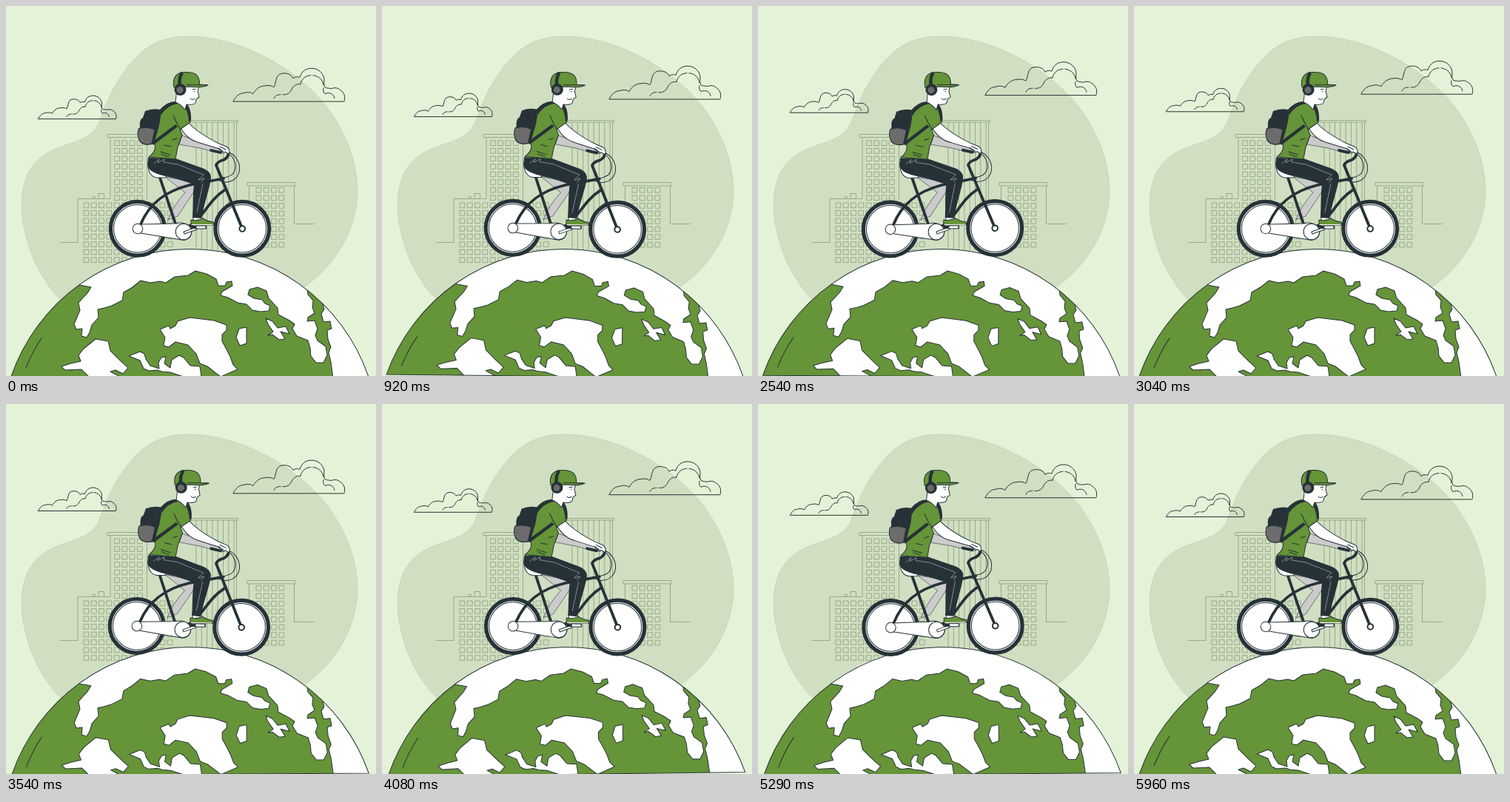
Write an HTML page that moves like this. It is 500 px wide and 500 px high and loops after 6000 ms.

```html
<!DOCTYPE html>
<html lang="en">
<head>
<meta charset="utf-8">
<title>Cycling over the globe</title>
<style>
html, body { margin: 0; height: 100%; overflow: hidden; background: #e4f3d7; }
svg { display: block; width: 100%; height: 100%; }
.line { fill: none; stroke: #263238; stroke-width: 1; stroke-linejoin: round; stroke-linecap: round; }
.city { fill: none; stroke: #90a583; stroke-width: .9; }
.dark { fill: #263238; }
.white { fill: #fff; stroke: #263238; stroke-width: 1; stroke-linejoin: round; }
.green { fill: #669438; stroke: #263238; stroke-width: 1; stroke-linejoin: round; }
.grey { fill: #cbcbcb; stroke: #263238; stroke-width: .6; }
.tube { fill: none; stroke: #263238; stroke-width: 3.8; stroke-linecap: round; stroke-linejoin: round; }
.band { stroke-width: 4.5; stroke-linecap: butt; }
.stitch { stroke: #aab0b3; stroke-width: .7; }
.sole { stroke: #fff; }
#cloud path { vector-effect: non-scaling-stroke; }
</style>
</head>
<body>
<svg viewBox="0 0 500 500">
  <defs>
    <path id="dome" d="M7 500.5A255.3 255.3 0 0 1 489.700 500.5Z"/>
    <clipPath id="inDome"><use href="#dome"/></clipPath>
    <g id="cloud" class="line">
      <path d="M0 0C3 -6 8 -11 14 -11C19 -13 24 -12 27 -10C30 -16 36 -21 44 -21C50 -22 53 -20 55 -19C58 -24 57 -32 62 -36C69 -40 79 -37 81 -31C85 -34 88 -33 90 -32C92 -40 98 -44.500 106 -44.500C115 -44.500 122 -38 123 -30C123 -25 122 -22 124 -19C127 -17 130 -18 132 -17C138 -19 142 -18 145 -15C150 -12 152 -6 150 0Z"/>
      <path d="M55 -4C57 -8 60 -9 64 -9M67 -9C72 -8 77 -11 79 -16C82 -22 87 -24 91 -23C92 -30 98 -35 105 -35M108 -35C116 -34 121 -29 122 -22M122 -18C121 -15 122 -12 124 -10C130 -13 136 -10 137 -4"/>
    </g>
    <g id="wheel">
      <circle r="36.400" fill="#fff" stroke="#263238" stroke-width="5.200"/>
      <circle r="32.300" class="line"/>
    </g>
  </defs>

  <path fill="#d0dfc1" stroke="#bccbb0" stroke-width=".6" d="M250 41C310 42 380 76 424 125C458 163 475 211 475 249C475 300 447 350 400 382L250 450L82 404C48 378 21 318 21 268C22 228 37 204 72 191C99 181 117 178 126 157C134 137 139 119 156 94C181 57 206 40 250 41Z"/>

  <g class="city">
    <path d="M73 319.500H97V260.500H141V177.500M137 173.500H205V177.500H137ZM125 260V253.500H132.500V260M117 260V257.500H120V260M190.500 178V262"/>
    <path d="M250 154.500H313.500V157H250ZM311.500 157V330"/>
    <path id="stripes"/>
    <path d="M326 238.500H391V243H326ZM328.500 243V300M389.500 243V294.500H416.500"/>
    <path id="windows"/>
  </g>

  <g id="clouds">
    <use href="#cloud" x="307" y="128.700"/>
    <use href="#cloud" transform="translate(43.500 152.300) scale(.7)"/>
  </g>

  <g id="globe">
    <use href="#dome" fill="#fff"/>
    <g clip-path="url(#inDome)">
      <path class="green" d="M-5 510V440L60 370L99 377L115 380L110 388L98 401L100 411L92 430L95 437L103 436L102 446L109 448L113 441L116 431L125 421L124 410L133 408L143 405L157 398L159 387L171 380L182 371L195 374L208 372L216 374L228 366L246 364L256 358L271 362L284 369L287 378L296 378L298 373L305 372L306 378L292 386L290 391L300 394L313 401L325 403L333 411L344 413L355 412L357 405L350 402L346 397L335 395L327 390L329 383L340 380L352 385L355 395L367 408L368 417L383 425L390 430L387 436L393 446L408 452L411 462L412 473L419 482L429 482L434 472L432 460L421 452L418 445L421 436L417 425L407 426L408 421L417 415L414 407L415 398L408 390L406 375L440 390L428 403L430 410L426 416L429 427L438 426L440 436L434 438L435 450L439 461L436 468L439 481L443 510Z"/>
      <path class="white" d="M229 432L232 426L248 421L281 425L298 431L298 438L292 444L292 453L298 464L303 474L307 485L313 491L290 501L272 487L262 483L257 470L246 458L229 454L220 461L213 459L215 448L208 437L220 432L222 436Z"/>
      <path class="white" d="M315 436L325 434L325 456L316 459L311 448Z"/>
      <path class="white" d="M351 422L360 426L367 435L378 433L383 443L371 440L377 450L369 451L360 444L354 445L361 440L354 430Z"/>
      <path class="white" d="M75 487L88 483L101 480L98 472L105 463L121 450L138 453L141 466L154 479L165 489L158 497L148 492L141 494L156 502H113L102 491L80 492Z"/>
      <path class="white" d="M166 473L181 467L187 470L189 477L195 486L207 490L206 482L210 475L216 474L214 483L222 489L224 478L234 472L240 475L249 486L262 487L264 501L240 501L222 495L211 494L204 492L193 493L186 490L181 479Z"/>
      <path class="line" d="M48 449Q36 466 27 489"/>
    </g>
    <use href="#dome" class="line"/>
  </g>

  <g id="rider">
    <use href="#wheel" x="177.800" y="300.800"/>
    <use href="#wheel" x="319.300" y="300.800"/>

    <path class="grey" d="M215 231L256 238Q257 247 252 254L232 284L219 289Q226 270 242 252Z"/>
    <path class="grey" d="M238 175L234 187L262 192L284 198L290 193L262 184Z"/>

    <path class="tube" d="M182 295C194 266 216 250 248 242L294 233"/>
    <path class="tube" d="M208 232L229 294M245 299C265 290 272 264 295 249"/>
    <path class="tube" d="M319 300L284 215Q286 210 294 208Q303 203 300 196"/>
    <path class="tube" d="M277 195L290 198"/>
    <path class="line" d="M302 198C322 208 320 238 296 238L288 236M303 201C313 211 313 227 299 231L290 233"/>

    <path class="white" d="M182 295L230 294Q240 291 248 298A11 11 0 0 1 237 316L182 307Z"/>
    <circle class="white" cx="178" cy="301" r="6.800"/>
    <circle class="white" cx="240" cy="305" r="10.800"/>
    <circle class="dark" cx="319.300" cy="301" r="4.800"/>
    <circle cx="319.300" cy="301" r="2.800" fill="#fff"/>
    <path class="white" d="M240 305L257 299L258 302L241 308Z"/>
    <path class="dark" d="M250 297H271V301H250Z"/>
    <path class="white" d="M257 297H270V301H257Z"/>

    <path class="white" d="M192 217C193 226 197 231 204 232H214Q218 231 218 227L200 219Z"/>
    <path class="white" d="M253 285H265L266 291H253Z"/>
    <path class="green" d="M250 289Q258 291 266 287Q272 291 280 292L281 296H250Z"/>
    <path class="line sole" d="M251 295.500H279"/>
    <path class="dark" d="M192 205L229 206L268 220Q278 225 277 233C275 248 269 262 264 287L252 286C253 271 252 256 254 241L229 233C211 229 193 226 191 215Z"/>
    <path class="line stitch" d="M200 213L207 207L205 212L214 207L213 211L232 214L267 228L260 235L268 233L264 238M266 240L258 279"/>

    <path class="white" d="M246 157C254 166 270 177 288 186L298 190Q304 194 301 200L296 197L294 199L288 193L262 185C250 182 243 176 236 165Z"/>
    <path class="line" d="M289 190L297 194M287 192L294 197"/>
    <path class="green" d="M227 130Q218 133 211 141L205 160L200 184Q205 195 193 204L229 207L232 191L238 174L235 167L249 157L244 138Q241 133 238 133Z"/>
    <path class="line" d="M226 148Q230 158 236 167M209 197L222 201M210 200L220 204M225 181L231 179M214 188L223 190"/>
    <path class="dark" d="M242 130Q251 137 250 155L247 156Q247 143 240 134ZM207 141Q218 128 231 129L232 132Q218 134 209 148ZM197 184L229 160L232 163L199 188Z"/>
    <path class="dark" d="M188 142Q198 138 208 140Q210 151 206 165L200 186Q190 190 181 184Q176 176 181 163Q180 153 185 151Z"/>
    <path d="M179 166Q190 162 201 167L197 186Q188 189 182 184Q176 177 179 166Z" fill="#6c6c6c" stroke="#263238"/>

    <path class="white" d="M231 112L229 130Q235 132 242 140L244 133Q253 134 256 131L257 126L261 123L259 115L261 107H235Z"/>
    <path class="line" d="M249 125Q252 128 255 125M252 113L256 112"/>
    <circle class="dark" cx="254.500" cy="115.500" r=".8"/>
    <path class="green" d="M227 110C224 96 231 89 243 89.500C256 89 262 94 261.500 106L273 107Q264 111 248 109Z"/>
    <path class="line" d="M244 106.500H272"/>
    <path class="tube band" d="M238 90Q233 98 235 109"/>
    <circle class="dark" cx="235.500" cy="113" r="8"/>
    <circle cx="235" cy="113.500" r="4.500" fill="#6c6c6c"/>
  </g>
</svg>
<script>
const $ = id => document.getElementById(id);

const grid = (x, y, cols, rows) => {
  let d = '';
  for (let r = 0; r < rows; r++)
    for (let c = 0; c < cols; c++)
      d += `M${x + c * 10.3} ${y + r * 10.55}h6.8v6.6h-6.8z`;
  return d;
};
$('windows').setAttribute('d',
  grid(146.5, 182, 4, 8) + grid(105, 266, 12, 8) + grid(338, 245.5, 4, 8));

let stripes = '';
for (let x = 257; x < 311; x += 7.3) stripes += `M${x} 157V330`;
$('stripes').setAttribute('d', stripes);

// Linear swing 0 → 1 → -1 → 0 over one period
const swing = p => p < .25 ? 4 * p : p < .75 ? 2 - 4 * p : 4 * p - 4;
const move = (id, value) => $(id).setAttribute('transform', value);

function draw(now) {
  const p = now / 6000 % 1;
  move('clouds', `translate(0 ${-10 * (1 - Math.abs(2 * p - 1))})`);
  move('globe', `rotate(${swing(p)} 248.4 415)`);
  move('rider', `rotate(${swing(2 * p % 1)} 248.7 215)`);
  requestAnimationFrame(draw);
}
draw(performance.now());
</script>
</body>
</html>
```
